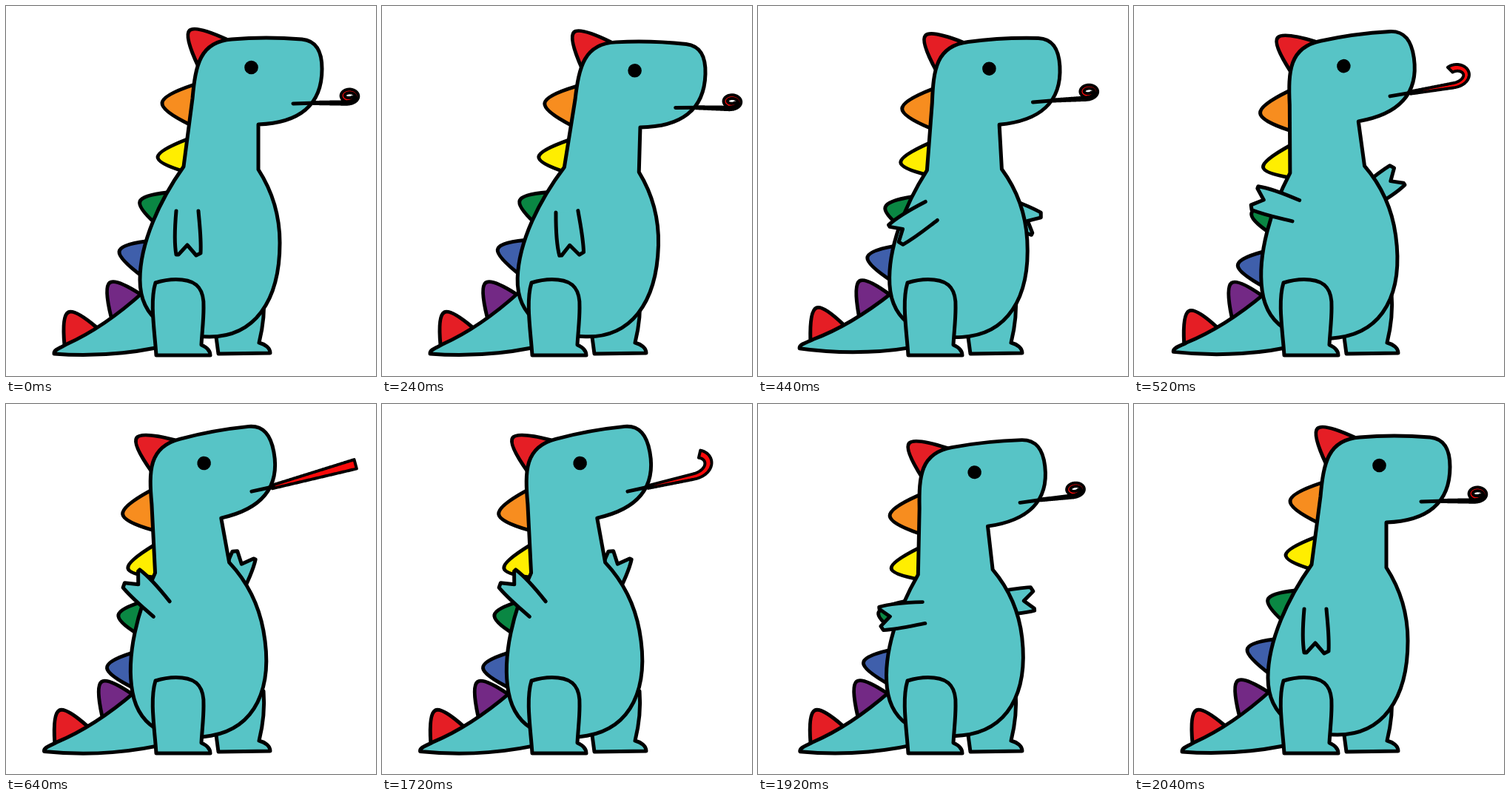
Animation of 500 by 500 pixels, one loop 2600 ms. Source, as an HTML page with a canvas:

```html
<!DOCTYPE html>
<html lang="en">
<head>
<meta charset="utf-8">
<title>Dinosaur with a party blower</title>
<style>
html, body { margin: 0; height: 100%; overflow: hidden; background: #fff; }
canvas { display: block; width: 100vmin; height: 100vmin; }
</style>
</head>
<body>
<canvas width="500" height="500"></canvas>
<script>
const ctx = document.querySelector('canvas').getContext('2d');
const LOOP = 2600, STEP = 40, DEG = Math.PI / 180;
const TEAL = '#57c4c6', RED = '#e51e25';

const tail = 'M65 470C64 464 76 461 82 457C120 440 155 414 185 387L235 420V454C190 467 130 475 65 470Z';
const backLeg = 'M283 440L287 470L357 469C357 462 350 457 342 455C347 435 350 412 348 388';
const frontLeg = 'M203 472C201 440 194 400 202 374C215 370 229 369 238 370C260 372 268 385 267 408' +
  'C267 425 265 440 264 458C271 461 276 466 276 472Z';
const body = 'M240 217L252 125C256 80 262 48 305 45C340 42 375 43 400 45C420 47 427 62 427 85' +
  'C427 135 395 158 341 160V221C361 252 370 285 370 320C370 400 335 447 275 447' +
  'C225 447 181 425 181 370C181 320 208 262 240 217Z';
const arm = 'M-15 0C-17 23 -17 48 -15 59L-12 59L0 46L12 60L18 57C19 38 17 23 15 0';

const clamp = v => Math.max(0, Math.min(1, v));
const ramp = (t, from, to) => clamp((t - from) / (to - from));
const smooth = k => k * k * (3 - 2 * k);
const bump = (t, from, to) => Math.sin(Math.PI * ramp(t, from, to));

function shape(path, fill, width = 5) {
  const p = new Path2D(path);
  ctx.lineWidth = width;
  if (fill) { ctx.fillStyle = fill; ctx.fill(p); }
  ctx.stroke(p);
}

// A rounded spike from base point a over the tip to base point b.
function spike(color, [ax, ay], [tx, ty], [bx, by]) {
  const kx = (ax - bx) * .2, ky = (ay - by) * .2;
  shape(`M${ax} ${ay}Q${tx + kx} ${ty + ky} ${tx} ${ty}Q${tx - kx} ${ty - ky} ${bx} ${by}`, color);
}

// Draws inside a frame moved by dx, dy and turned around a pivot.
function turned(px, py, angle, draw, dx = 0, dy = 0, squash = 1) {
  ctx.save();
  ctx.translate(px + dx, py + dy);
  ctx.scale(1, squash);
  ctx.rotate(angle * DEG);
  ctx.translate(-px, -py);
  draw();
  ctx.restore();
}

function drawArm(x, y, angle) {
  turned(0, 0, angle, () => shape(arm, TEAL), x, y);
}

// A tapered tape that unrolls as open goes from 0 to 1.
function blower(open) {
  const length = 117, straight = 42 + 30 * open, turn = 430 * (1 - open);
  const squeeze = .7 + .3 * open ** 3;
  const upper = [], lower = [];
  let x = 416, y = 131;
  for (let s = 0; s <= length; s++) {
    const heading = -(5 * open + turn * ramp(s, straight, length) ** 1.3) * DEG;
    const w = 1 + 1.2 * open + s / length * (2 + 2.2 * open);
    const dx = Math.cos(heading), dy = Math.sin(heading);
    upper.push([x + dy * w, y - dx * w]);
    lower.unshift([x - dy * w, y + dx * w]);
    x += dx;
    y += dy * squeeze;
  }
  shape('M' + upper.concat(lower).join('L') + 'Z', '#fa0a0a', 4);
  shape('M388 132L418 131');
}

function drawTail() {
  spike(RED, [79, 458], [84, 414], [122, 434]);
  spike('#732985', [142, 420], [140, 374], [181, 389]);
  shape(tail, TEAL);
}

function drawBody(open) {
  spike(RED, [260, 82], [248, 33], [298, 45]);
  spike('#f78d1f', [252, 107], [211, 131], [248, 160]);
  spike('#ffee00', [245, 180], [205, 204], [242, 224]);
  spike('#0a8743', [218, 252], [181, 264], [202, 294]);
  spike('#3f5fab', [189, 318], [153, 332], [185, 366]);
  shape(body, TEAL);
  blower(open);
  ctx.fillStyle = '#000';
  ctx.beginPath();
  ctx.arc(331.5, 83, 9.3, 0, 7);
  ctx.fill();
}

function draw(t) {
  // The dinosaur winds up, rears back, blows, then drops back to rest.
  const rise = smooth(ramp(t, 290, 610)) - ramp(t, 1720, 2040) ** 2;
  const wind = smooth(ramp(t, 120, 340)) * (1 - smooth(ramp(t, 290, 610)));
  const lean = 2.8 * wind - 10.3 * rise;
  const squash = 1 - .013 * bump(t, 160, 560) - .035 * bump(t, 1760, 2040);
  const raise = 147 * rise - 11 * wind, lift = raise * .07;
  const swish = bump(t, 340, 540);
  const open = ramp(t, 460, 580) - ramp(t, 1680, 1792);
  const withBody = part => turned(282, 447, lean, part, 2 * rise, 0, squash);

  ctx.fillStyle = '#fff';
  ctx.fillRect(0, 0, 500, 500);
  ctx.lineCap = ctx.lineJoin = 'round';
  turned(200, 450, 1.5 * rise + 3 * swish, drawTail, -13 * rise - 2 * swish, 3 * rise);
  withBody(() => drawArm(332, 275 - lift, -raise));
  shape(backLeg, TEAL);
  withBody(() => drawBody(open));
  shape(frontLeg, TEAL);
  withBody(() => drawArm(245 - lift / 2, 277 - lift, raise));
}

function tick() {
  const t = performance.now() % LOOP;
  draw(Math.floor(t / STEP) * STEP);
  requestAnimationFrame(tick);
}
tick();
</script>
</body>
</html>
```
